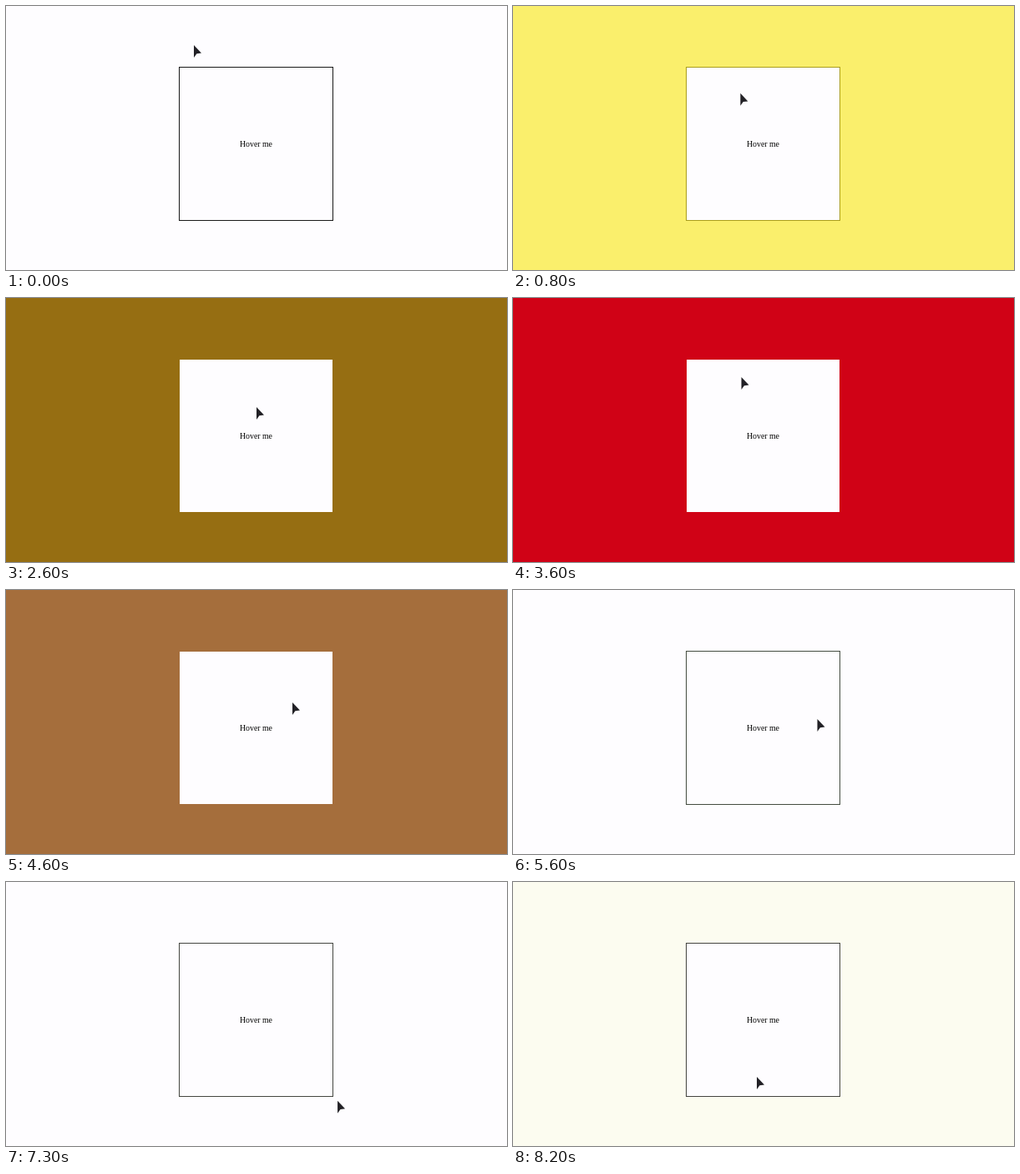
An HTML page for the animation above (8300 ms loop, 600 by 317 pixels).

```html
<!DOCTYPE html>
<html lang="en">
<head>
<meta charset="utf-8">
<title>Hover me</title>
<style>
  html, body { margin: 0; width: 100%; height: 100%; overflow: hidden; background: #fefdff; }
  svg { display: block; width: 100vw; height: 100vh; }
  text { font-family: "Liberation Serif", Times, serif; font-size: 9.8px; }
</style>
</head>
<body>
<svg viewBox="0 0 600 317">
  <rect id="page" width="600" height="317"/>
  <rect id="box" x="207.5" y="73.5" width="184" height="184" fill="#fefdff"/>
  <text x="299.5" y="169" text-anchor="middle">Hover me</text>
  <path id="cursor" d="M0 0V15L3.4 10.2L9 9.6Z" fill="#222126"/>
</svg>
<script>
const LOOP = 8300, STEP = 100;
const $ = id => document.getElementById(id);
const page = $('page'), box = $('box'), cursor = $('cursor');

const WHITE = [254, 253, 255], INK = [25, 25, 25];
const YELLOW = [248, 231, 28], GREEN = [124, 213, 4];
const BROWN = [150, 110, 18], RED = [208, 2, 22], TAN = [165, 110, 60];

// Each key: time, then the values reached at that time
const pageKeys = [
  [0, WHITE], [500, WHITE], [1000, YELLOW], [1500, GREEN], [2600, BROWN],
  [3600, RED], [4600, TAN], [5600, WHITE], [8100, WHITE], [8200, [252, 252, 240]]
];
const lineKeys = [
  [0, INK], [500, INK], [1000, YELLOW], [1500, GREEN], [2600, BROWN],
  [3600, RED], [4600, TAN], [5600, [68, 76, 64]], [8200, [68, 68, 64]]
];
const pathKeys = [
  [0, [225, 47]], [200, [227, 50]], [900, [275, 108]], [1500, [304, 134.5]],
  [2600, [300, 131]], [3600, [273.5, 95]], [4600, [343, 135]], [6100, [372, 162]],
  [6500, [382, 169.5]], [6900, [415, 200]], [7400, [395, 270]],
  [7900, [310, 275]], [8200, [292, 234]]
];

const smooth = u => u * u * (3 - 2 * u);

function sample(keys, t) {
  let i = 0;
  while (i < keys.length - 2 && t > keys[i + 1][0]) i++;
  const [t0, a] = keys[i], [t1, b] = keys[i + 1];
  const u = smooth(Math.min(1, Math.max(0, (t - t0) / (t1 - t0))));
  return a.map((v, k) => v + (b[k] - v) * u);
}

const rgb = c => `rgb(${c.map(Math.round)})`;

function draw(now) {
  const t = Math.floor((now % LOOP) / STEP) * STEP;
  page.setAttribute('fill', rgb(sample(pageKeys, t)));
  box.setAttribute('stroke', rgb(sample(lineKeys, t)));
  cursor.setAttribute('transform', `translate(${sample(pathKeys, t)})`);
}

const start = performance.now();
function tick() {
  draw(performance.now() - start);
  requestAnimationFrame(tick);
}
tick();
</script>
</body>
</html>
```
